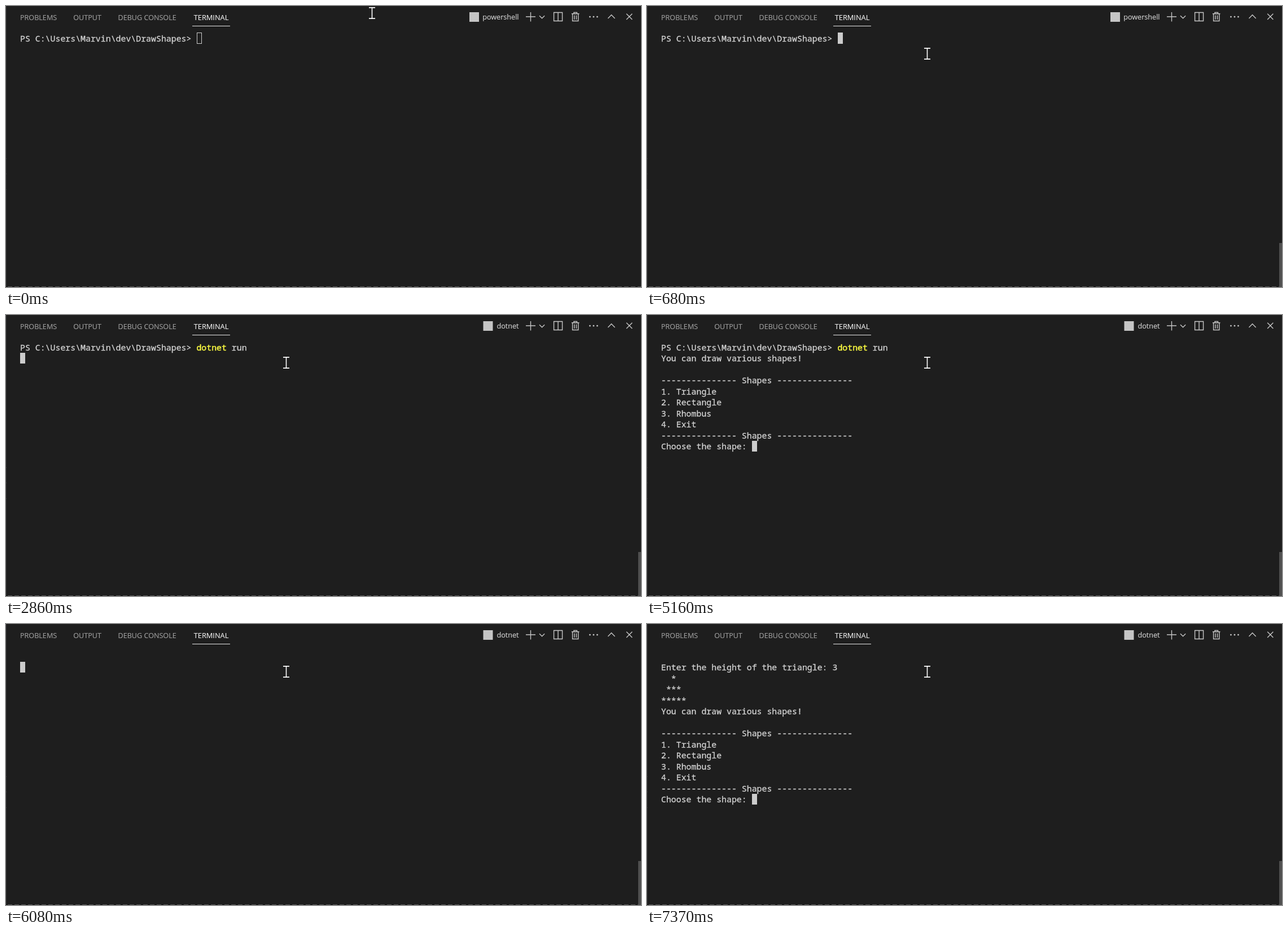
Recreate the animation shown at these times as an HTML page. Size 1125 px wide and 498 px high, loop 8 s.

```html
<!DOCTYPE html>
<html lang="en">
<head>
<meta charset="utf-8">
<title>Terminal session</title>
<style>
  html, body { margin: 0; width: 100%; height: 100%; overflow: hidden; background: #1e1e1e; }
  svg { display: block; }
  text { white-space: pre; }
  .ui { font: 12.6px "Open Sans", "Noto Sans", sans-serif; fill: #9d9d9d; stroke: #9d9d9d; stroke-width: .15; }
  .ui .active { fill: #eee; stroke: #eee; font-size: 12.8px; }
  .ui .label { fill: #d0d0d0; stroke: #d0d0d0; }
  .term { font: 14.88px "Noto Sans Mono", "DejaVu Sans Mono", monospace; fill: #d4d4d4; stroke: #d4d4d4; stroke-width: .3; }
  .command { fill: #f8f840; stroke: #f8f840; stroke-width: .5; }
  .icons { fill: none; stroke: #c5c5c5; stroke-width: 1.4; }
</style>
</head>
<body>
<svg width="1125" height="498" viewBox="0 0 1125 498">
  <rect width="1125" height="498" fill="#1e1e1e"/>
  <path d="M.5 0V498" stroke="#29292b"/>
  <path d="M0 270.5h1M0 297.5h1M0 325.5h1" stroke="#444"/>
  <path d="M0 497.5H1125" stroke="#111"/>
  <path d="M3 497.5H1125" stroke="#555" stroke-dasharray="8 4"/>

  <g class="ui">
    <text x="25" y="25">PROBLEMS</text>
    <text x="119.3" y="25">OUTPUT</text>
    <text x="198.5" y="25">DEBUG CONSOLE</text>
    <text class="active" x="332.7" y="25">TERMINAL</text>
    <text class="label" id="shell" x="908.5" y="24" text-anchor="end"></text>
  </g>
  <path d="M330 35.5H397" stroke="#e7e7e7"/>
  <rect id="badge" y="11" width="17" height="17" fill="#c5c5c5"/>

  <g class="icons">
    <path d="M921 19H938M929.5 11V27.5"/>
    <path d="M945 17.2L949.6 21.8L954.2 17.2"/>
    <path d="M970.6 11.5H985.6V26.5H970.6ZM978.1 11.5V26.5"/>
    <path d="M1002 13.8H1015.5M1006 13.5V11.5H1011.5V13.5M1003.6 14V26.5H1013.9V14M1007 16.5V24M1010.5 16.5V24"/>
    <path d="M1066.5 22L1072.6 15.8L1078.7 22"/>
    <path d="M1099.2 13.8L1109.4 24M1109.4 13.8L1099.2 24"/>
    <path d="M1034.5 19.2h.01M1041 19.2h.01M1047.5 19.2h.01" stroke-width="2.8" stroke-linecap="round"/>
  </g>

  <g class="term" id="lines"></g>
  <rect id="block"/>
  <rect id="scrollbar" x="1120" y="420" width="5" height="78" fill="#4f4f4f"/>
  <path id="pointer" d="M-5.5 -9.6H5.5M-5.5 9.6H5.5M0 -9.6V9.6" fill="none" stroke="#fff" stroke-width="1.6"/>
  <circle id="click" cx="494.5" cy="83.5" r="14.5" fill="#ff0" fill-opacity=".47"/>
</svg>
<script>
const LOOP = 8000, LEFT = 25, COLUMN = 8.93, ROW = 19.5;
const byId = id => document.getElementById(id);
const el = Object.fromEntries(
  ['shell', 'badge', 'lines', 'block', 'scrollbar', 'pointer', 'click'].map(id => [id, byId(id)]));

const prompt = 'PS C:\\Users\\Marvin\\dev\\DrawShapes> ';
const command = 'dotnet';
const typed = prompt + command + ' run';
const rule = `${'-'.repeat(15)} Shapes ${'-'.repeat(15)}`;
const menu = ['You can draw various shapes!', '', rule,
  '1. Triangle', '2. Rectangle', '3. Rhombus', '4. Exit', rule, 'Choose the shape: '];
const question = 'Enter the height of the triangle: ';
const triangle = [1, 2, 3].map(n => ' '.repeat(3 - n) + '*'.repeat(2 * n - 1));

// Each screen: start time, then its lines; the block sits after the last one.
const screens = [
  [0, [prompt]],
  [1490, [typed]],
  [1940, [typed, '']],
  [5160, [typed, ...menu]],
  [5820, [typed, ...menu.slice(0, -1), menu.at(-1) + '1']],
  [6080, ['', '']],
  [6150, ['', question]],
  [7030, ['', question + '3']],
  [7370, ['', question + '3', ...triangle, ...menu]]
];
const pointerStops = [[0, [648.5, 12.5]], [70, [585, 45.5]], [170, [521.5, 78.5]], [320, [496.5, 84.5]]];

const at = (steps, time) => steps.findLast(([start]) => start <= time)[1];

function set(node, attributes) {
  for (const name in attributes) node.setAttribute(name, attributes[name]);
}

function lineMarkup(line, row) {
  const html = line.replace('>', '&gt;')
    .replace(command, `<tspan class="command">${command}</tspan>`);
  return `<text x="${LEFT}" y="${62.5 + row * ROW}">${html}</text>`;
}

let shown;
function drawScreen(lines) {
  if (lines === shown) return;
  shown = lines;
  el.lines.innerHTML = lines.map(lineMarkup).join('');
}

function drawBlock(lines, focused) {
  const row = lines.length - 1;
  const x = Math.round(LEFT + lines[row].length * COLUMN);
  const y = Math.round(47.3 + row * ROW);
  const height = Math.round(66.5 + row * ROW) - y;
  set(el.block, focused
    ? { x, y, width: 9, height, fill: '#ccc', stroke: 'none' }
    : { x: x + .5, y: y + .5, width: 8, height: height - 1, fill: 'none', stroke: '#ccc' });
}

function draw(time) {
  const lines = at(screens, time);
  drawScreen(lines);
  drawBlock(lines, time >= 470);

  const running = time >= 2860;
  el.shell.textContent = running ? 'dotnet' : 'powershell';
  set(el.badge, { x: running ? 845.5 : 821 });
  set(el.pointer, { transform: `translate(${at(pointerStops, time)})` });
  set(el.scrollbar, { opacity: time < 70 ? 0 : time < 170 ? .4 : 1 });
  set(el.click, { opacity: time >= 470 && time < 680 ? 1 : 0 });
}

const begin = performance.now();
function tick() {
  draw((performance.now() - begin) % LOOP);
  requestAnimationFrame(tick);
}
tick();
</script>
</body>
</html>
```
